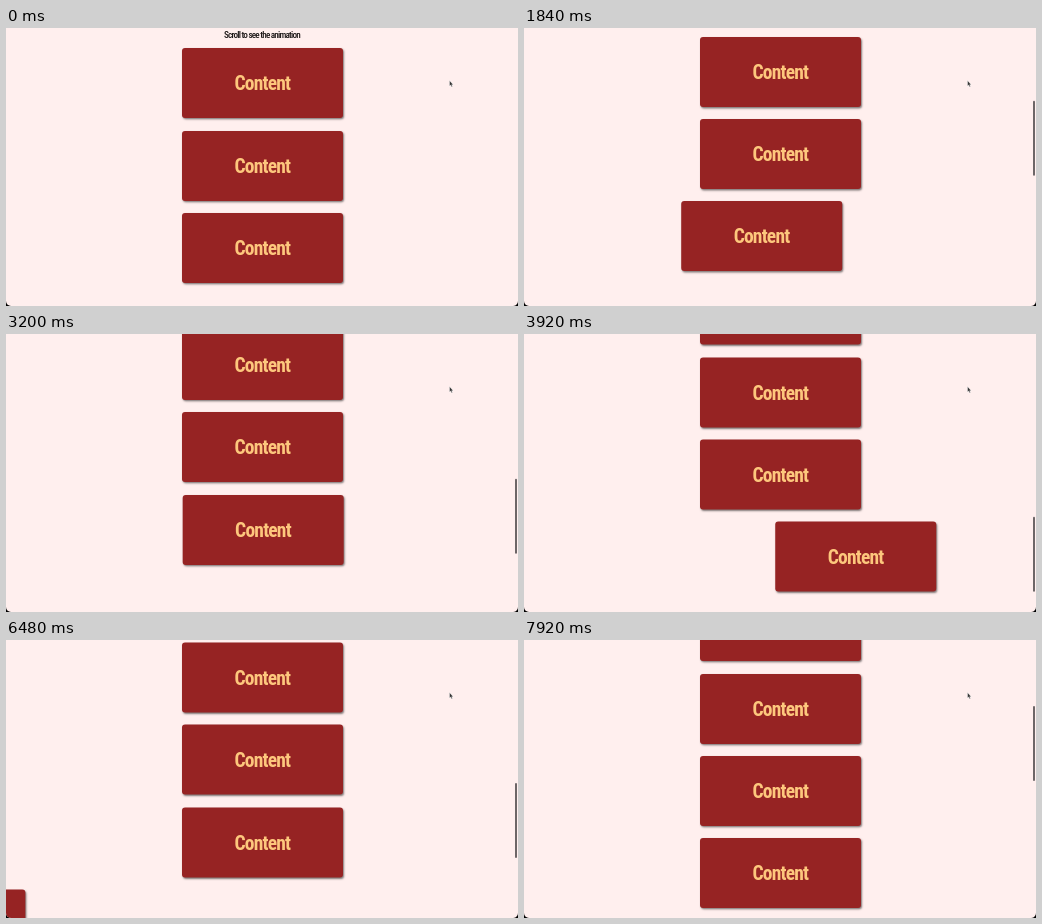
An HTML page that plays this animation: 512 px wide and 278 px high, repeating every 8 s.

```html
<!DOCTYPE html>
<html lang="en">
<head>
<meta charset="utf-8">
<title>Scroll animation</title>
<style>
  html, body { margin: 0; width: 100%; height: 100%; overflow: hidden; background: #000; }
  #stage {
    position: relative; width: 512px; height: 278px; overflow: hidden;
    background: #ffefee; border-radius: 0 0 5px 5px;
    font-family: "Roboto Condensed", Roboto, sans-serif; letter-spacing: -.05em;
  }
  #page { position: absolute; inset: 0; }
  h1 {
    position: absolute; top: 0; left: 0; width: 100%; margin: 0;
    font-size: 9.2px; font-weight: 500; line-height: 14px;
    text-align: center; color: #1c1717;
  }
  .box {
    position: absolute; left: 176px; width: 160.6px; height: 70.2px;
    border-radius: 3px; background: #962323; color: #fdc77d;
    box-shadow: 1px 1.3px 2px rgba(0, 0, 0, .5);
    font-size: 19.5px; font-weight: 700; line-height: 71px; text-align: center;
  }
  #thumb {
    position: absolute; left: 508.5px; top: 0; width: 2.6px; height: 75px;
    border-radius: 2px; background: #6d6667;
  }
  #cursor { position: absolute; left: 443px; top: 52.2px; }
</style>
</head>
<body>
<div id="stage">
  <div id="page"><h1>Scroll to see the animation</h1></div>
  <div id="thumb"></div>
  <svg id="cursor" width="6" height="9">
    <path d="M.5 .5V6L1.7 5 2.6 7 3.5 6.6 2.7 4.7H4.2Z" fill="#333" stroke="#fff" stroke-width=".4"/>
  </svg>
</div>
<script>
  const LOOP = 8000, TOP = 20.3, PITCH = 82.4, COUNT = 12, SLIDE = 400;
  const ENTER_Y = 233.4, LEAVE_Y = 227.6, AWAY = 641;

  // [time in ms, scroll offset in px]
  const down = [[0, 0], [240, 0], [490, 12], [740, 48], [1280, 151.3],
                [2480, 381.5], [3920, 656.2], [4280, 725]];
  const up = [[5350, 725], [5440, 708.1], [6480, 512.6], [7920, 234.2], [8000, 218.8]];
  const path = [...down, ...up];

  function lerp(points, x) {
    let i = 1;
    while (i < points.length - 1 && points[i][0] < x) i++;
    const [x0, y0] = points[i - 1], [x1, y1] = points[i];
    return y0 + (y1 - y0) * (x - x0) / (x1 - x0);
  }

  // Times at which the scroll offset passes a value
  const timeDown = s => lerp(down.map(([t, v]) => [v, t]), s);
  const timeUp = s => lerp(up.map(([t, v]) => [-v, t]), -s);

  // CSS "ease": cubic-bezier(.25, .1, .25, 1)
  function ease(x) {
    if (x <= 0) return 0;
    if (x >= 1) return 1;
    let lo = 0, hi = 1, u;
    for (let i = 0; i < 20; i++) {
      u = (lo + hi) / 2;
      const bx = .75 * u * (1 - u) + u ** 3;
      if (bx < x) lo = u; else hi = u;
    }
    return .3 * u * (1 - u) ** 2 + 3 * u * u * (1 - u) + u ** 3;
  }

  const page = document.getElementById('page');
  const thumb = document.getElementById('thumb');
  const boxes = Array.from({ length: COUNT }, (_, i) => {
    const el = document.createElement('div');
    const y = TOP + PITCH * i;
    el.className = 'box';
    el.textContent = 'Content';
    el.style.top = y + 'px';
    page.append(el);
    return {
      el,
      side: i % 2 ? -1 : 1,
      enter: i < 3 ? -SLIDE : timeDown(y - ENTER_Y),
      leave: i < 3 ? Infinity : timeUp(y - LEAVE_Y)
    };
  });

  function draw(now) {
    const t = now % LOOP, scroll = lerp(path, t);
    page.style.transform = `translateY(${-scroll}px)`;
    thumb.style.transform = `translateY(${1.15 + scroll * .2766}px)`;
    thumb.style.opacity = scroll > 0 ? 1 : 0;
    for (const { el, side, enter, leave } of boxes) {
      const shown = ease((t - enter) / SLIDE) - ease((t - leave) / SLIDE);
      el.style.transform = `translateX(${side * AWAY * (1 - shown)}px)`;
    }
    requestAnimationFrame(() => draw(performance.now() - start));
  }
  const start = performance.now();
  draw(0);
</script>
</body>
</html>
```
